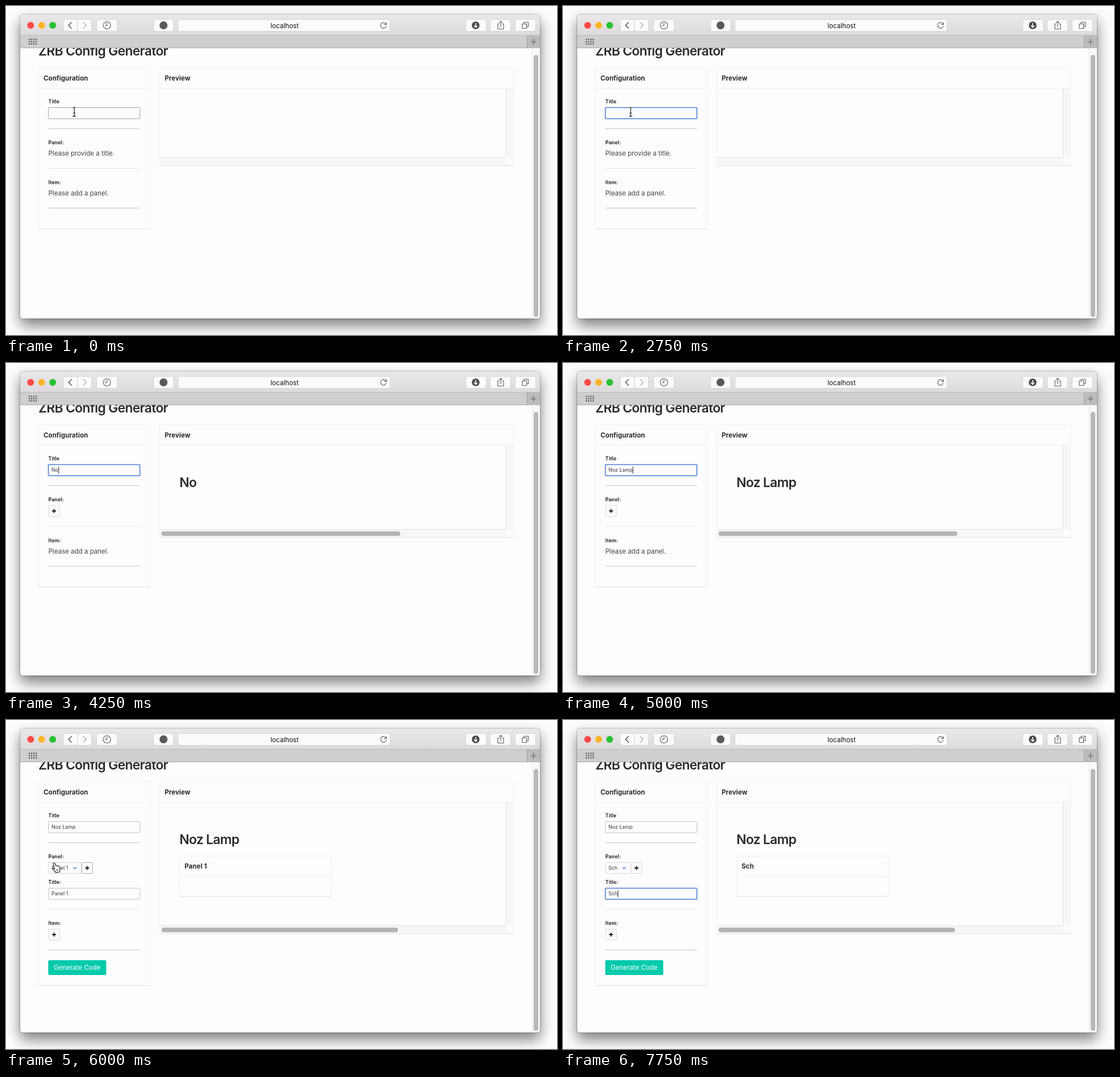
Write an HTML page that moves like this. It is 969x578 px and loops after 8 s.

```html
<!DOCTYPE html>
<html lang="en">
<head>
<meta charset="utf-8">
<style>
  html, body { margin: 0; width: 100%; height: 100%; overflow: hidden; background: #fefdfe; }
  svg { display: block; }
  text { font-family: Inter, sans-serif; fill: #333; white-space: pre; }
  .heading { font-size: 22.9px; font-weight: 600; letter-spacing: -.7px; fill: #2b292b; }
  .strong { font-size: 11.5px; font-weight: 700; fill: #2b292b; letter-spacing: .05px; }
  .body { font-size: 11.5px; fill: #454345; }
  .label { font-size: 8.6px; font-weight: 700; fill: #2b292b; letter-spacing: .2px; }
  .value { font-size: 8.7px; letter-spacing: .1px; }
  .address { font-size: 11.6px; fill: #111; text-anchor: middle; }
  .window { fill: #fefcfe; filter: drop-shadow(0 0 .8px rgba(0,0,0,.55)) drop-shadow(0 12px 12px rgba(0,0,0,.5)); }
  .button { fill: #fcfafc; stroke: #cfcdcf; stroke-width: .8; }
  .icon { fill: none; stroke: #5c5a5c; stroke-width: 1.1; }
</style>
</head>
<body>
<svg width="969" height="578" viewBox="0 0 969 578">
  <defs>
    <linearGradient id="bar" x2="0" y2="1">
      <stop stop-color="#ebe8eb"/><stop offset="1" stop-color="#d5d2d5"/>
    </linearGradient>
  </defs>
  <rect class="window" x="25" y="15" width="914" height="534" rx="4.5"/>
  <g id="page"></g>
  <g id="chrome"></g>
  <g id="mouse"></g>
</svg>
<script>
const STEP = 250, STEPS = 32;
const $ = id => document.getElementById(id);
const pen = document.createElement('canvas').getContext('2d');

const rect = (x, y, w, h, attrs) => `<rect x="${x}" y="${y}" width="${w}" height="${h}" ${attrs}/>`;
const text = (x, y, kind, s) => `<text x="${x}" y="${y}" class="${kind}">${s}</text>`;
const path = (d, attrs) => `<path d="${d}" ${attrs}/>`;
const line = (d, color, width = 1) => path(d, `fill="none" stroke="${color}" stroke-width="${width}"`);

function valueWidth(s) {
  pen.font = '8.7px Inter, sans-serif';
  return pen.measureText(s).width + s.length * .1;
}

function chrome() {
  const button = (x, w) => rect(x + .5, 23.5, w - 1, 21, 'rx="3.5" class="button"');
  const icon = d => path(d, 'class="icon"');
  let s = path('M25 73.5V19.5Q25 15 29.5 15H934.5Q939 15 939 19.5V73.5Z', 'fill="url(#bar)"')
    + rect(25, 52, 914, 21.5, 'fill="#d1ced1"')
    + line('M25 51.6H939', '#bbb8bb') + line('M25 73.6H939', '#aaa7aa')
    + rect(916, 52, 23, 21.5, 'fill="#bebbbe"') + line('M916.5 52V73', '#a5a2a5');
  ['#fc4b48', '#fdb528', '#28c231'].forEach((c, i) =>
    s += `<circle cx="${43.3 + 19.4 * i}" cy="34" r="6" fill="${c}"/>`);
  for (const [x, w] of [[100, 26], [125, 26], [159, 37], [259, 36], [302, 374], [808, 37], [851, 37], [895, 37]])
    s += button(x, w);
  s += line('M115.5 28.5L110 34L115.5 39.5', '#4b494b', 1.4)
    + line('M135.5 28.5L141 34L135.5 39.5', '#b3b1b3', 1.4)
    + '<circle cx="177.5" cy="34" r="6.5" class="icon"/>' + icon('M177.5 29.5V34.5H174')
    + '<circle cx="277" cy="34" r="7" fill="#5a585a"/>'
    + icon('M668.5 32.2A5 5 0 1 0 668.8 35M669 28.5V32.5H665')
    + '<circle cx="826" cy="34" r="6.8" fill="#4c4a4c"/>'
    + line('M826 30V37M823 34.5L826 37.5L829 34.5', '#fff', 1.6)
    + icon('M867.5 31.5H865V40.5H875V31.5H872.5M870 37V27M867 29.7L870 26.7L873 29.7')
    + icon('M908 31.5H915.5V39.5H908ZM911 31V28.5H918.5V36.5H916')
    + line('M922.5 63H933M927.8 57.8V68.3', '#5c5a5c', 1.1)
    + text(490, 38.5, 'address', 'localhost');
  for (let i = 0; i < 12; i++)
    s += rect(40 + i % 4 * 4, 57.5 + Math.floor(i / 4) * 4, 2.2, 2.2, 'fill="#514f51"');
  return s
    + rect(925, 74, 14, 471, 'fill="#faf8fa"') + line('M925.5 74V548.5', '#e6e4e6')
    + rect(928, 86, 8, 460, 'rx="4" fill="#b9b7b9"');
}

function card(x, y, w, h, title, headerWidth = w) {
  return rect(x, y, w, h, 'fill="#fefcfe" stroke="#f1eff1"')
    + line(`M${x} ${y + h + .5}h${w}`, '#e3e1e3')
    + line(`M${x} ${y + 35.5}h${headerWidth}`, '#f0eef0')
    + text(x + 9, y + 21.5, 'strong', title);
}

const rule = (y, strong) => line(`M74.5 ${y}h161`, strong ? '#d6d4d6' : '#e6e4e6', strong ? 1.4 : 1);

function plusButton(x, y, active) {
  return rect(x + .5, y + .5, 19, 19, `rx="1" fill="#fefcfe" stroke="${active ? '#a9a7a9' : '#d8d6d8'}"`)
    + line(`M${x + 6.5} ${y + 10}h7M${x + 10} ${y + 6.5}v7`, '#222', 1.9);
}

function input(y, value, { focus, hover, caret, selected }) {
  const w = valueWidth(value);
  return rect(74.5, y + .5, 161, 19.5, `rx="1" fill="#fefcfe" stroke="${focus ? '#4a7fd2' : hover ? '#a3a1a3' : '#c4c2c4'}" stroke-width="${focus ? 1.6 : 1}"`)
    + (selected ? rect(80, y + 4, w, 12.5, 'fill="#b3d6fd"') : '')
    + text(80, y + 13.3, 'value', value)
    + (caret ? line(`M${80.7 + w} ${y + 4}v12.5`, '#222') : '');
}

function select(value) {
  const right = 74 + valueWidth(value) + 29.3, x = right - 11.7;
  return rect(74.5, 250.5, right - 74.5, 19, 'rx="1" fill="#fefcfe" stroke="#d8d6d8"')
    + text(80, 263.3, 'value', value)
    + line(`M${x - 3} 258.5l3 3l3 -3`, '#3b82d6', 1.2)
    + plusButton(right, 250, value === 'Panel 1');
}

// Last entry of [step, value] pairs that has begun.
const at = (keys, n) => keys.filter(k => k[0] <= n).pop();

const titleKeys = [[0, ''], [5, ''], [12, 'N'], [17, 'No'], [18, 'Noz'], [19, 'Noz La'], [20, 'Noz Lamp']];
const panelKeys = [[24, 'Panel 1'], [27, 'Panel 1'], [29, 'S'], [30, 'Sc'], [31, 'Sch']];
const mouseKeys = [
  [0, 'beam', 120, 186], [2, 'beam', 120, 187], [4, 'beam', 119, 186], [12],
  [21, 'arrow', 112, 207], [22, 'arrow', 98, 238], [23, 'hand', 88, 258], [24, 'hand', 88, 259],
  [25, 'hand', 90, 262], [26, 'arrow', 97, 283], [27, 'beam', 101, 305], [29]
];

function page(n) {
  const [titleStart, title] = at(titleKeys, n);
  const [panelStart, panel] = at(panelKeys, n) || [];
  const blink = start => (n - start) % 4 < 2;
  const editing = n >= 5 && !panel;
  const renaming = n >= 27;
  const shift = panel ? 47 : title ? 2 : 0;
  const bottom = panel ? 361.5 : title ? 292.5 : 266.5;

  let s = text(57, 87, 'heading', 'ZRB Config Generator')
    + card(57, 109, 196, panel ? 357 : 282 + shift, 'Configuration')
    + text(74.5, 171, 'label', 'Title')
    + input(178, title, { focus: editing, hover: n < 5, caret: editing && blink(titleStart) })
    + rule(215.5, true) + text(74.5, 243, 'label', 'Panel:');

  if (panel) {
    s += select(panel) + text(74.5, 288, 'label', 'Title:')
      + input(295, panel, {
        focus: renaming, selected: n === 28,
        caret: renaming && n !== 28 && blink(panelStart)
      });
  } else {
    s += title ? plusButton(74.5, 250) : text(74.5, 263, 'body', 'Please provide a title.');
  }

  s += rule(285.5 + shift) + text(74.5, 312.7 + shift, 'label', 'Item:');
  s += panel
    ? plusButton(74.5, 367) + rule(404, true)
      + rect(74.3, 422, 102, 26, 'rx="2" fill="#02caab"')
      + '<text x="84" y="439" class="body" style="fill:#fff">Generate Code</text>'
    : text(74.5, 332.5 + shift, 'body', 'Please add a panel.') + rule(355 + shift, true);

  s += card(270, 109, 623, bottom + 13.5 - 109, 'Preview')
    + rect(879, 145, 14, bottom - 145, 'fill="#f8f6f8"') + line(`M879.5 144.5V${bottom}`, '#e2e0e2')
    + rect(270, bottom, 609, 13.5, 'fill="#f8f6f8"') + line(`M270 ${bottom}H879`, '#e2e0e2');
  if (title)
    s += text(305, 217.5, 'heading', title)
      + rect(273.5, bottom + 3.3, panel ? 416 : 420, 8, 'rx="4" fill="#b5b3b5"');
  if (panel) s += card(305, 239, 267, 70.5, panel);
  return s;
}

const pointers = {
  beam: line('M-3-8Q0-8 0-6V6Q0 8-3 8M3-8Q0-8 0-6M0 6Q0 8 3 8M-2 2H2', '#fff', 2.6)
    + line('M-3-8Q0-8 0-6V6Q0 8-3 8M3-8Q0-8 0-6M0 6Q0 8 3 8M-2 2H2', '#222', 1.2),
  arrow: path('M-4-8V5L-1 2L1.2 7.2L3.3 6.3L1.2 1.3H5.5Z', 'fill="#111" stroke="#fff"'),
  hand: path('M-5-7q1.5-2.5 3 0l1.7 4q1.5-1.2 2.3.4q1.8-1 2.4.7q1.9-.4 2.2 2q.5 3.5-.4 8l-7 .8q-1-3-4.5-5.6q-1.2-2 .8-2q1 .3 1.8 1.2z',
    'fill="#fff" stroke="#222" stroke-width="1.2" stroke-linejoin="round"')
    + line('M1 3L1.5 6M3.2 2.8L3.5 5.8', '#222', .9)
};

function mouse(n) {
  const [, shape, x, y] = at(mouseKeys, n);
  return shape ? `<g transform="translate(${x} ${y})">${pointers[shape]}</g>` : '';
}

let shown = -1;
function tick() {
  const n = Math.floor(performance.now() / STEP) % STEPS;
  if (n !== shown) {
    shown = n;
    $('page').innerHTML = page(n);
    $('mouse').innerHTML = mouse(n);
  }
  requestAnimationFrame(tick);
}
$('chrome').innerHTML = chrome();
tick();
</script>
</body>
</html>
```
